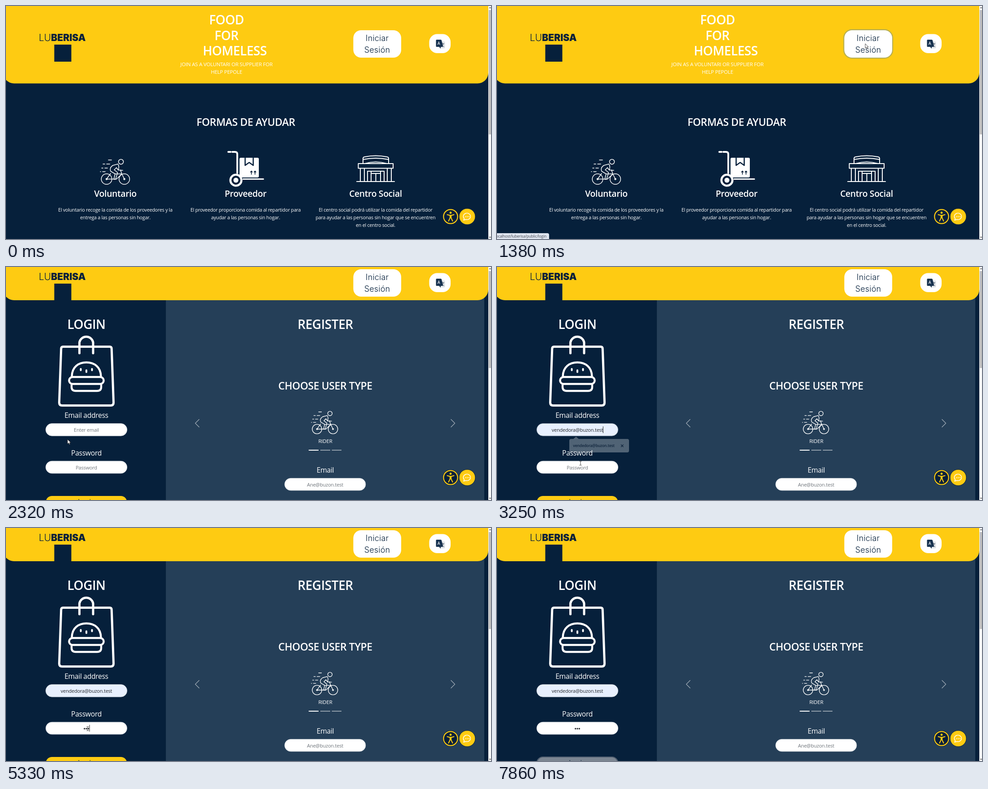
Write an HTML page that moves like this. It is 1080x519 px and loops after 8 s.

```html
<!DOCTYPE html>
<html lang="es">
<head>
<meta charset="utf-8">
<title>Food for homeless</title>
<style>
  html, body { margin: 0; width: 100%; height: 100%; overflow: hidden; background: #06203b; }
  svg { display: block; width: 100vw; height: 100vh; }
  text { font-family: "Open Sans", "Noto Sans", sans-serif; font-size: 10.7px; letter-spacing: -.021em; fill: #fff; text-anchor: middle; }
  .h1, .h2, .h3 { font-weight: 600; letter-spacing: -.016em; }
  .h1 { font-size: 28px; }
  .h2 { font-size: 22.9px; }
  .h3 { font-size: 19.3px; }
  .sub { font-size: 11.5px; }
  .label { font-size: 15.7px; }
  .input { font-size: 11px; fill: #6f757b; }
  .value { fill: #25292e; }
  .brand { font: 300 21px Inter, sans-serif; letter-spacing: 0; text-anchor: start; fill: #06203b; }
  .brand tspan { font-weight: 900; }
  .pill { font: 300 18px Inter, sans-serif; letter-spacing: .01em; fill: #06203b; }
  .line { fill: none; stroke: #fff; stroke-linecap: round; stroke-linejoin: round; }
  .gold { fill: none; stroke: #fecb12; stroke-linecap: round; stroke-linejoin: round; }
  .field { fill: #fff; stroke: #ced4da; stroke-width: .7; }
</style>
</head>
<body>
<svg viewBox="0 0 1080 519" preserveAspectRatio="none">
  <defs>
    <g id="cyclist" class="line" stroke-width="1.5">
      <circle cx="14" cy="45.500" r="11.800"/><circle cx="53.500" cy="45.500" r="11.800"/>
      <circle cx="14" cy="45.500" r="1.500"/><circle cx="53.500" cy="45.500" r="1.500"/>
      <circle cx="46" cy="7" r="5.500"/>
      <path d="M14 45.500 23 33M33 34H48L53.500 45.500M48 34 45 26H50M48 34 36 45.500H14"/>
      <path d="M39 12 28 15Q20 20 23 28L33 34 30 46H34L38.500 31 31 25 36 20 40 25.500H46M39 12Q43 17 40 25.500"/>
      <path d="M18 3H25M6 12H10M14 12H21M3 21H6M10 21H16M0 29H1M5 29H11"/>
    </g>
  </defs>

  <rect width="1080" height="519" fill="#06203b"/>

  <g id="home">
    <text class="h2" x="534" y="266.500">FORMAS DE AYUDAR</text>
    <use href="#cyclist" x="210" y="340"/>
    <g class="line" stroke-width="4">
      <path d="M495 325H500M504 325H510Q515 325 515 330V372"/>
      <rect x="521" y="339" width="41" height="42" rx="2" fill="#fff" stroke-width="2"/>
      <path d="M532.500 338V355L541.500 348.500 550.500 355V338" stroke="#06203b" stroke-width="2.600"/>
      <path d="M546.500 375V368M544.500 370 546.500 367.500 548.500 370M554.500 375V368M552.500 370 554.500 367.500 556.500 370" stroke="#06203b" stroke-width="1.600"/>
      <circle cx="512" cy="388" r="12.300" stroke-width="4.600"/>
      <circle cx="512" cy="388" r="4.500" fill="#fff" stroke-width="2"/>
      <path d="M528 385.500H573" stroke-width="3"/>
    </g>
    <g class="line" stroke-width="2">
      <path d="M795 350V340Q795 336.500 799 336Q823 331 848 336Q852 336.500 852 340V350M795 342Q823 336 852 342M799 351Q823 344 848 351"/>
      <rect x="784.500" y="351" width="77.500" height="10.500"/>
      <path d="M789 362V390M798 362V390M849 362V390M858 362V390M781 391H865"/>
      <path d="M805 390V368H842V390M813 368V390M834 368V390M813 373H834M823.500 373V390"/>
    </g>
    <text class="h3" x="243.500" y="425">Voluntario</text>
    <text class="h3" x="533.500" y="425">Proveedor</text>
    <text class="h3" x="823" y="425">Centro Social</text>
    <text x="243.500" y="457.500">El voluntario recoge la comida de los proveedores y la</text>
    <text x="243.500" y="474.500">entrega a las personas sin hogar.</text>
    <text x="533.500" y="457.500">El proveedor proporciona comida al repartidor para</text>
    <text x="533.500" y="474.500">ayudar a las personas sin hogar.</text>
    <text x="823" y="457.500">El centro social podrá utilizar la comida del repartidor</text>
    <text x="823" y="474.500">para ayudar a las personas sin hogar que se encuentren</text>
    <text x="823" y="491.500">en el centro social.</text>
  </g>

  <g id="login">
    <rect x="356" y="60" width="709" height="459" fill="#253f58"/>
    <text class="h1" x="179" y="138">LOGIN</text>
    <g class="line" stroke-width="5">
      <path d="M127 177.500H231Q235 177.500 235.200 182L239.500 302Q239.500 308.500 233 308.500H125Q118.500 308.500 118.500 302L122.800 182Q123 177.500 127 177.500Z"/>
      <path d="M163.500 192V168A15.500 15.500 0 0 1 194 168V192"/>
      <g stroke-width="4.400">
        <path d="M146.500 244C147 222 162 212.500 179 212.500S211 222 211.500 244"/>
        <rect x="140.500" y="245" width="77" height="15.500" rx="7.700"/>
        <path d="M146 261V267Q146 276 155 276H203Q212 276 212 267V261"/>
        <path d="M166.500 227V230M179 230V234M191.500 227V230" stroke-width="4"/>
      </g>
    </g>
    <text class="label" x="179" y="336">Email address</text>
    <text class="label" x="179" y="420">Password</text>
    <rect id="mailBox" class="field" x="88.400" y="348.600" width="181.200" height="27.600" rx="13.800"/>
    <text id="mailText" class="input" x="179" y="367"></text>
    <rect id="passBox" class="field" x="88.400" y="432.200" width="181.200" height="27.600" rx="13.800"/>
    <text id="passHint" class="input" x="179" y="450.700">Password</text>
    <g id="dots" fill="#25292e">
      <circle cy="447" r="1.700"/><circle cy="447" r="1.700"/><circle cy="447" r="1.700"/>
    </g>
    <rect id="caret" width="1" height="15" fill="#222"/>
    <rect id="submit" x="88.500" y="510" width="181" height="30" rx="14" stroke-width="2.200"/>
    <text class="label" x="179" y="528.500" style="fill:#06203b">Login</text>

    <g id="popup">
      <path d="M165 383H170L176 378 182 383H290Q294 383 294 387V409Q294 413 290 413H165Q161 413 161 409V387Q161 383 165 383Z" fill="#fff"/>
      <text x="215.500" y="401.300" style="font-size:8.600px;font-weight:600;fill:#26313d">vendedora@buzon.test</text>
      <path d="M276 395.500 281.500 401M281.500 395.500 276 401" stroke="#26313d" stroke-width="1.300"/>
    </g>

    <text class="h1" x="711" y="138">REGISTER</text>
    <text class="h2" x="711" y="273">CHOOSE USER TYPE</text>
    <use href="#cyclist" transform="translate(680 320) scale(.9)"/>
    <text class="sub" x="711" y="392" font-weight="500">RIDER</text>
    <path d="M674 408H696" stroke="#fff" stroke-width="2"/>
    <path d="M700 408H722M725.500 408H747" stroke="#929fab" stroke-width="2"/>
    <path class="line" d="M430 339.500 421.500 348 430 356.500M991 339.500 999.500 348 991 356.500" stroke-width="1.300" opacity=".55"/>
    <text class="label" x="711" y="458">Email</text>
    <rect class="field" x="620.400" y="470.400" width="180.500" height="27.400" rx="13.700"/>
    <text class="input" x="710.500" y="489">Ane@buzon.test</text>
  </g>

  <rect id="bar" x="-6" y="-60" width="1080" height="232.600" rx="24" fill="#fecb12"/>
  <g id="slogan">
    <text class="h1" x="491" y="41">FOOD</text>
    <text class="h1" x="491" y="75.500">FOR</text>
    <text class="h1" x="509.500" y="109.500">HOMELESS</text>
    <text class="sub" x="491" y="134.300">JOIN AS A VOLUNTARI OR SUPPLIER FOR</text>
    <text class="sub" x="491" y="151.300">HELP PEPOLE</text>
  </g>
  <g id="tools">
    <text class="brand" x="73" y="78">LU<tspan>BERISA</tspan></text>
    <rect x="107.500" y="86" width="38" height="38" fill="#06203b"/>
    <rect id="ring" x="772.400" y="53" width="108.500" height="63" rx="18" fill="none" stroke="#b3ad55" stroke-width="2.400"/>
    <rect x="773.400" y="53.900" width="106.600" height="61.200" rx="17.500" fill="#fff"/>
    <text class="pill" x="826.500" y="78">Iniciar</text>
    <text class="pill" x="826.500" y="103.500">Sesión</text>
    <rect x="942.400" y="62.500" width="47.700" height="42.500" rx="18" fill="#fff"/>
    <rect x="964.500" y="79" width="13" height="15.500" rx="1.500" fill="#e4e7ea"/>
    <path d="M967 84H976M971.500 82V84M974 84Q973 88.500 968.500 91M969 84.500Q971 89 975.500 91" fill="none" stroke="#3b4c5e"/>
    <path d="M959 75H968Q969.500 75 970 76.500L973 91H968V95L964.500 91H959Q957.500 91 957.500 89.500V76.500Q957.500 75 959 75Z" fill="#17324f"/>
    <path d="M961.300 86.500 963.700 79.500 966.100 86.500M962.200 84.200H965.200" fill="none" stroke="#fff"/>
  </g>

  <circle cx="990" cy="469" r="17.500" fill="#06203b"/>
  <circle class="gold" cx="990" cy="469" r="15.700" stroke-width="2.200"/>
  <circle cx="990" cy="460.500" r="2.400" fill="#fecb12"/>
  <path class="gold" d="M982.500 464.800 988 466.300H992L997.500 464.800M988.800 467V472L985.500 479M991.200 467V472L994.500 479" stroke-width="2"/>
  <path class="gold" d="M990 467V471.500" stroke-width="3"/>
  <circle cx="1027" cy="469" r="18" fill="#fecb12" stroke="#06203b"/>
  <path class="line" d="M1020.500 473.500A8 7.200 0 1 1 1024 475.500L1019 477Z" stroke-width="1.400"/>
  <path class="line" d="M1023.500 469.300H1023.600M1027.200 469.300H1027.300M1030.900 469.300H1031" stroke-width="2"/>

  <rect x="1074" width="6" height="519" fill="#fafafa"/>
  <rect id="thumb" x="1075" y="9" width="5" fill="#bdbdbd"/>
  <path d="M1075.500 5 1078 2 1080 5ZM1075.500 514 1078 517 1080 514Z" fill="#666"/>

  <g id="status">
    <path d="M0 506H112Q116 506 116 510V519H0Z" fill="#dfe5f0"/>
    <text x="110" y="516" style="font-size:8.500px;text-anchor:end;fill:#474c55">localhost/luberisa/public/login</text>
  </g>

  <g id="pointer">
    <path id="arrow" d="M0 0V10L2.400 7.800 4 11.300 5.700 10.600 4.100 7.300H7.200Z" fill="#fff" stroke="#222" stroke-width=".8"/>
    <path id="beam" d="M-2.500 -4.500H-.8L0 -4 .8 -4.500H2.500M0 -4V4M-2.500 4.500H-.8L0 4 .8 4.500H2.500" fill="none" stroke="#444"/>
  </g>
</svg>
<script>
const LOOP = 8000;
const $ = id => document.getElementById(id);
const show = (id, on) => $(id).style.display = on ? '' : 'none';
const set = (id, name, value) => $(id).setAttribute(name, value);
const clamp = v => Math.max(0, Math.min(1, v));
const ramp = (t, from, to) => clamp((t - from) / (to - from));
const mix = (a, b, k) => a + (b - a) * k;
const rgb = (a, b, k) => `rgb(${a.map((v, i) => Math.round(mix(v, b[i], k)))})`;

// time, x, y
const route = [
  [110, 1040, 496], [850, 800, 66], [1000, 820, 84], [1520, 820, 84],
  [2320, 137, 384], [2390, 137, 384], [2560, 172, 365], [2720, 172, 365],
  [2960, 196, 397], [3060, 196, 397], [3250, 186, 437], [3520, 182, 447],
  [5330, 182, 447], [5600, 178, 504], [5860, 178, 504], [6050, 178, 515], [LOOP, 178, 515]
];
const yellow = [254, 203, 18], olive = [122, 104, 36], grey = [124, 134, 146];

function pointerAt(t) {
  const i = Math.max(1, route.findIndex(p => p[0] >= t));
  const [a, b] = [route[i - 1], route[i]];
  const k = ramp(t, a[0], b[0]), e = k * k * (3 - 2 * k);
  return [mix(a[1], b[1], e), mix(a[2], b[2], e)];
}

function drawPointer(t) {
  const [x, y] = pointerAt(t);
  const inField = t >= 1520 && x > 88 && x < 270 && (y > 348 && y < 377 || y > 432 && y < 460);
  show('pointer', t >= 110 && t < 7590);
  set('pointer', 'transform', `translate(${x} ${y})`);
  show('arrow', !inField);
  show('beam', inField);
}

function drawForm(t) {
  const filled = t >= 2860, mailFocus = t >= 2600 && t < 3520;
  const passFocus = t >= 3520 && t < 6250;
  $('mailText').textContent = filled ? 'vendedora@buzon.test' : 'Enter email';
  $('mailText').classList.toggle('value', filled);
  $('mailBox').style.fill = filled ? '#e8f0fe' : '#fff';
  $('mailBox').style.stroke = mailFocus ? '#8d9bab' : '';
  $('passBox').style.stroke = passFocus ? '#9aa8b6' : '';

  const typed = [4730, 5060, 5330].filter(at => t >= at).length;
  show('passHint', !typed);
  [...$('dots').children].forEach((dot, i) => {
    dot.style.display = i < typed ? '' : 'none';
    dot.setAttribute('cx', 179 + (i - (typed - 1) / 2) * 4.3);
  });

  const passCaret = t >= 3520 && t < 4200 || t >= 4730 && t < 5860;
  show('caret', mailFocus || passCaret);
  const mailEnd = filled ? $('mailText').getComputedTextLength() / 2 : 0;
  set('caret', 'x', 178.5 + (mailFocus ? mailEnd : typed * 2.15 + (typed ? .6 : 0)));
  set('caret', 'y', mailFocus ? 355 : 438.5);

  $('popup').style.opacity = ramp(t, 2640, 2720) * (1 - ramp(t, 3190, 3277));

  const press = ramp(t, 6440, 6590), wait = ramp(t, 7590, 7860);
  set('submit', 'fill', wait ? rgb(olive, grey, wait) : rgb(yellow, olive, press));
  set('submit', 'stroke', `rgba(76,91,109,${press})`);
}

function draw(t) {
  const login = t >= 1520;
  show('home', !login);
  show('slogan', !login);
  show('login', login);
  set('bar', 'transform', `translate(0 ${login ? -98.6 : 0})`);
  set('tools', 'transform', `translate(0 ${login ? -49 : 0})`);
  set('thumb', 'height', login ? 216 : 277);
  $('ring').style.opacity = login ? 0 : ramp(t, 1230, 1380);
  show('status', t >= 920 && !login);
  if (login) drawForm(t);
  drawPointer(t);
}

const start = performance.now();
function tick() {
  draw((performance.now() - start) % LOOP);
  requestAnimationFrame(tick);
}
tick();
</script>
</body>
</html>
```
